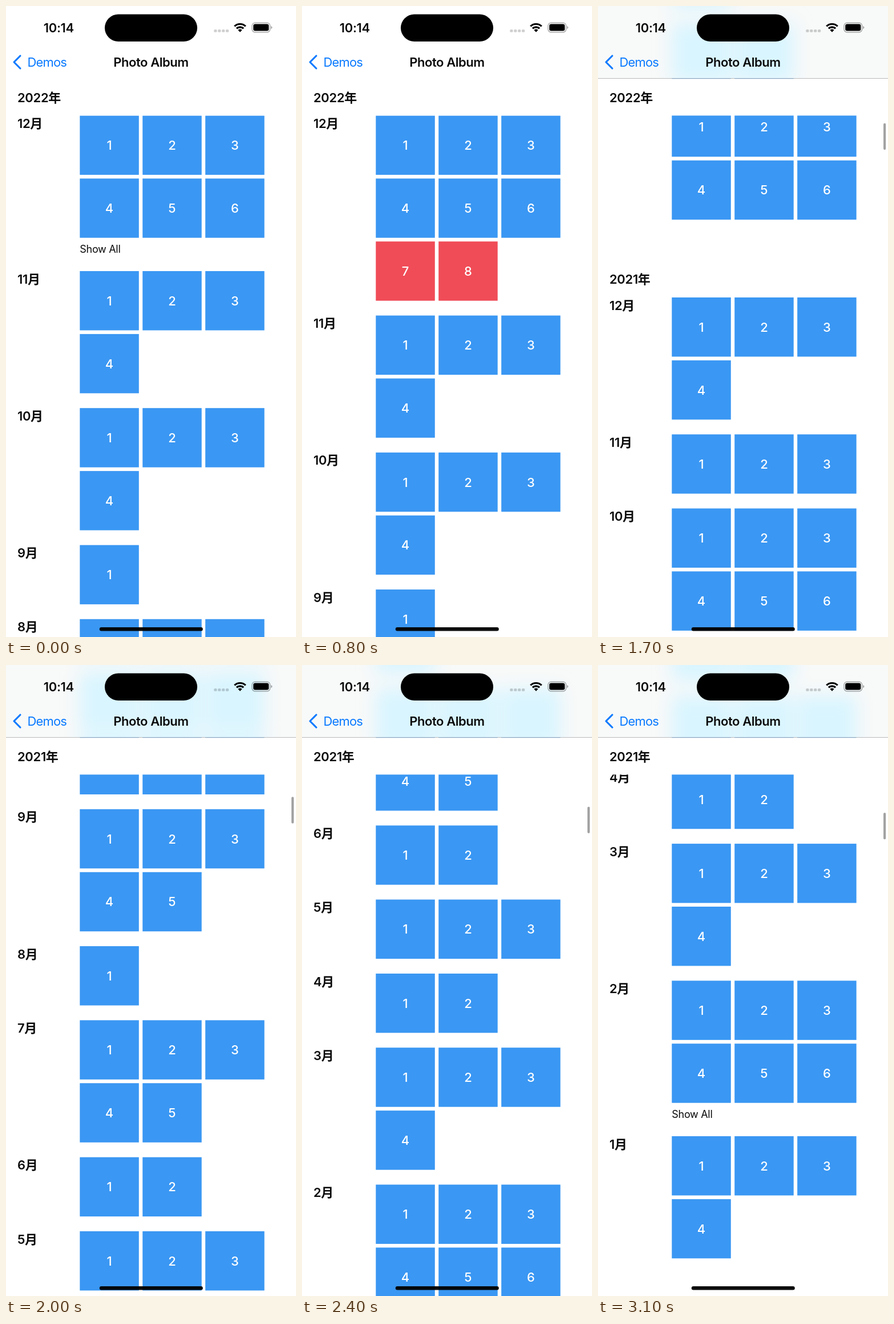
An HTML page for the animation above (3200 ms loop, 508 by 1102 pixels).

```html
<!DOCTYPE html>
<html lang="ja">
<head>
<meta charset="utf-8">
<title>Photo Album</title>
<style>
  html, body { margin: 0; width: 100%; height: 100%; overflow: hidden; background: #fff; }
  svg { display: block; width: 508px; height: 1102px; }
  text { font-family: Inter, "Noto Sans CJK JP", "Noto Sans CJK SC", sans-serif; font-size: 22px; fill: #0b0b0b; }
  .bold { font-weight: 600; letter-spacing: -.35px; }
  .num { font-weight: 500; fill: #fff; text-anchor: middle; }
  .small { font-size: 18px; letter-spacing: -.3px; }
  .mid { text-anchor: middle; }
</style>
</head>
<body>
<svg viewBox="0 0 508 1102" xmlns="http://www.w3.org/2000/svg">
  <defs>
    <clipPath id="barClip"><rect width="508" height="126"/></clipPath>
    <filter id="soft" filterUnits="userSpaceOnUse" x="-60" y="-80" width="628" height="300">
      <feGaussianBlur stdDeviation="15"/>
    </filter>
  </defs>
  <rect width="508" height="1102" fill="#fff"/>
  <g id="content"></g>
  <g id="headers"></g>
  <g id="bar" clip-path="url(#barClip)">
    <rect width="508" height="126" fill="#f8f9f9"/>
    <g filter="url(#soft)"><g id="tints"></g></g>
  </g>
  <rect id="line" y="126" width="508" height="1" fill="#a4a4a4" fill-opacity=".75"/>

  <text class="bold mid" x="92.3" y="45.8">10:14</text>
  <rect x="173" y="14.5" width="162" height="47.5" rx="23.7"/>
  <g id="dots" fill="#000" fill-opacity=".19"></g>
  <g id="wifi" fill="none" stroke="#000" stroke-width="3.2"></g>
  <rect x="431" y="29.4" width="31.6" height="16.4" rx="5.2" fill="none" stroke="#000" stroke-opacity=".4" stroke-width="1.2"/>
  <rect x="433.2" y="31.6" width="27.2" height="12" rx="3.3"/>
  <path d="M464.4 35q1.9 .8 1.9 2.6t-1.9 2.6z" fill-opacity=".4"/>

  <path d="M25 87L14 98L25 109" fill="none" stroke="#0a7aff" stroke-width="3.1" stroke-linecap="round" stroke-linejoin="round"/>
  <text x="37.6" y="106" style="fill:#0a7aff;letter-spacing:-.85px">Demos</text>
  <text class="bold mid" x="254" y="106" style="letter-spacing:-.45px">Photo Album</text>

  <rect id="thumb" x="500" width="4.2" height="46.5" rx="2.1" fill="#000" fill-opacity=".36"/>
  <rect x="163.8" y="1085" width="181" height="6.6" rx="3.3" fill-opacity=".95"/>
</svg>
<script>
const K = 1.2932;            // pixels per layout point
const LOOP = 3200, STEP = 100;
const TOP = 148, BAR = 98, HEAD = 50, SECTION_GAP = 35;
const TILE = 80, PITCH = 85, LEFT = 100, LIMIT = 6;
const BLUE = '#3a97f3', RED = '#f04c57', TINT = '#d9f5ff';

// Photos per month, December first.
const YEARS = [
  { year: 2022, counts: [8, 4, 4, 1, 8, 8, 5, 5, 3, 4, 2, 6] },
  { year: 2021, counts: [4, 3, 6, 5, 1, 5, 2, 3, 2, 4, 8, 4] }
];

const $ = id => document.getElementById(id);

function add(parent, tag, attrs, text) {
  const el = document.createElementNS('http://www.w3.org/2000/svg', tag);
  for (const k in attrs) el.setAttribute(k, attrs[k]);
  if (text !== undefined) el.textContent = text;
  parent.appendChild(el);
  return el;
}

const shift = (el, y) => el.setAttribute('transform', `translate(0 ${(y * K).toFixed(2)})`);
const clamp = v => Math.max(0, Math.min(1, v));
const smooth = v => v * v * (3 - 2 * v);

const content = $('content'), tints = $('tints');
const extra = add(content, 'g');
const first = add(content, 'g');
const rest = add(content, 'g');
const heads = [];
let showAll;

function addTile(group, i, top, fill) {
  const x = (LEFT + i % 3 * PITCH) * K;
  const y = (top + Math.floor(i / 3) * PITCH) * K;
  const size = TILE * K;
  const box = { x, y, width: size, height: size };
  add(group, 'rect', { ...box, fill });
  add(group, 'text', { class: 'num', x: x + size / 2, y: y + size / 2 + 8 }, i + 1);
  add(tints, 'rect', { ...box, fill: TINT });
}

function addMonth(group, month, count, top, opens) {
  const shown = Math.min(count, LIMIT);
  add(group, 'text', { class: 'bold', x: 20, y: top * K + 21.6 }, month + '月');
  for (let i = 0; i < shown; i++) addTile(group, i, top, BLUE);
  if (opens) for (let i = shown; i < count; i++) addTile(extra, i, top, RED);
  if (count > LIMIT) {
    const label = add(group, 'text', { class: 'small', x: 129.3, y: top * K + 239.6 }, 'Show All');
    if (opens) showAll = label;
  }
  const rows = Math.ceil((opens ? count : shown) / 3);
  return rows * PITCH + 15 + (count > LIMIT && !opens ? 25 : 0);
}

function build() {
  let y = TOP;
  YEARS.forEach(({ year, counts }, n) => {
    if (n) y += SECTION_GAP + HEAD;
    const g = add($('headers'), 'g');
    add(g, 'rect', { y: .4, width: 508, height: HEAD * K - .4, fill: '#fff' });
    add(g, 'text', { class: 'bold', x: 20, y: 40.9 }, year + '年');
    heads.push({ g, y: y - HEAD });
    counts.forEach((count, i) => {
      const opens = !n && !i;
      y += addMonth(opens ? first : rest, 12 - i, count, y, opens);
    });
  });

  for (let i = 0; i < 4; i++)
    add($('dots'), 'rect', { x: 364.3 + i * 6.9, y: 41, width: 5.2, height: 4.8, rx: 1.6 });

  const wedge = r => {
    const dx = r * .68, y = 45.8 - r * .733;
    return `M${410 - dx} ${y}A${r} ${r} 0 0 1 ${410 + dx} ${y}`;
  };
  add($('wifi'), 'path', { d: wedge(14.3) });
  add($('wifi'), 'path', { d: wedge(9) });
  add($('wifi'), 'path', { d: wedge(5.2) + 'L410 45.8z', fill: '#000', stroke: 'none' });
}

// Drag that speeds up, then a release that slows down exponentially.
function scrollAt(t) {
  if (t < 1100) return 0;
  if (t < 1400) return 720.8 * Math.pow((t - 1100) / 300, 2.25);
  return 3421.8 - 2701 * Math.exp(-(t - 1400) / 500);
}

function draw(t) {
  const open = smooth(clamp((t - 480) / 300));
  const s = scrollAt(t);
  const over = clamp(s / 12);

  shift(content, -s);
  shift(tints, -s);
  shift(rest, -60 * (1 - open));
  extra.setAttribute('opacity', open);
  showAll.setAttribute('opacity', 1 - open);

  heads.forEach(({ g, y }, i) => {
    const next = heads[i + 1];
    let top = Math.max(BAR, y - s);
    if (next) top = Math.min(top, next.y - s - HEAD);
    shift(g, top);
  });

  for (const id of ['bar', 'line', 'thumb']) $(id).setAttribute('opacity', over);
  $('thumb').setAttribute('y', 130.4 + s * .0383);
}

let start;
function tick(now) {
  if (start === undefined) start = now;
  const t = (now - start) % LOOP;
  draw(Math.floor(t / STEP) * STEP);
  requestAnimationFrame(tick);
}

build();
draw(0);
requestAnimationFrame(tick);
</script>
</body>
</html>
```
